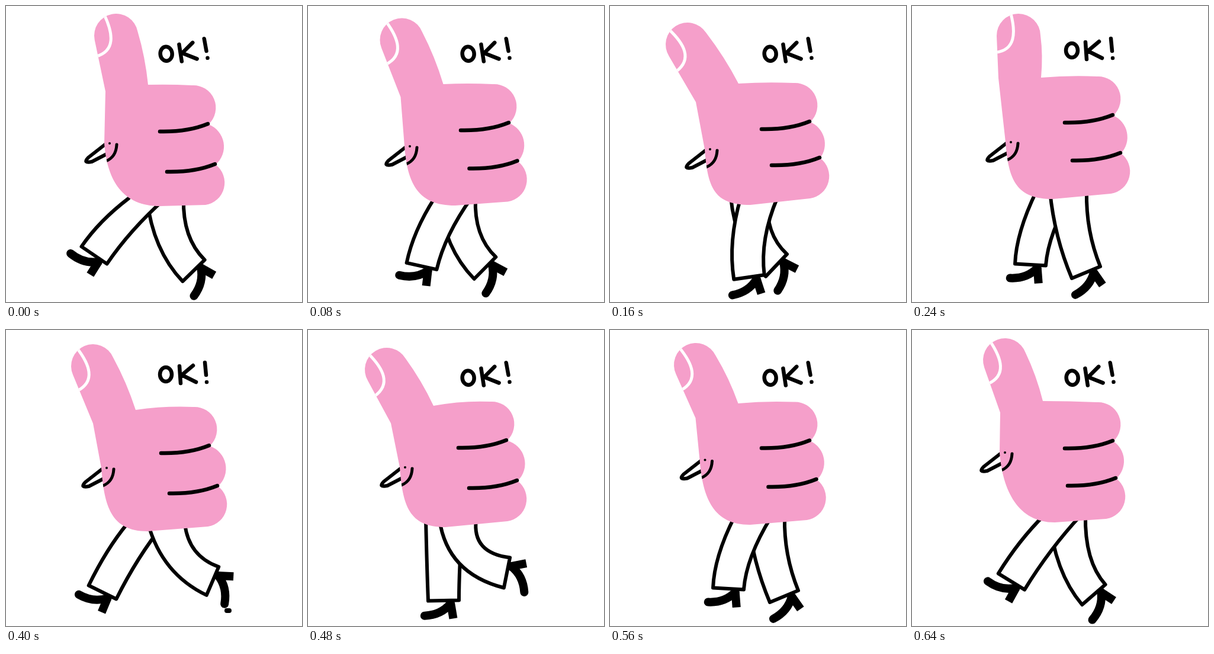
Write an HTML page with a canvas that moves like this. It is 500 px wide and 500 px high and loops after 0.72 s.

```html
<!DOCTYPE html>
<html lang="en">
<head>
<meta charset="utf-8">
<title>Walking thumb</title>
<style>
  html, body { margin: 0; height: 100%; overflow: hidden; background: #fff; }
  canvas { display: block; width: 100vw; height: 100vh; }
</style>
</head>
<body>
<canvas id="stage" width="500" height="500" role="img" aria-label="OK!"></canvas>
<script>
const ctx = document.getElementById('stage').getContext('2d');
const PINK = '#f59fca', BLACK = '#000', WHITE = '#fff';
const STEP = 80, THUMB = 37;

// tip: centre of the thumb's end, web: where thumb and fist meet,
// gaps: between the fingers. Legs: hip x, knee x y, ankle x y.
const stride = {
  tip: [186, 50], web: [240, 133], gap1: [342, 200], gap2: [354, 268], eye: [175, 232],
  near: [238, 183, 371, 149, 421], far: [269, 273, 402, 317, 447]
};
const pass = {
  tip: [131, 65], web: [217, 131], gap1: [338, 196], gap2: [355, 257], eye: [169, 242],
  near: [252, 226, 396, 235, 458], far: [235, 237, 396, 281, 438]
};
const reach = {
  tip: [180, 50], web: [218, 121], gap1: [340, 185], gap2: [353, 249], eye: [167, 230],
  near: [264, 267, 385, 294, 450], far: [241, 203, 384, 200, 437]
};
const kick = {
  tip: [147, 61], web: [219, 135], gap1: [344, 196], gap2: [358, 264], eye: [170, 233],
  near: [271, 286, 397, 349, 424], far: [236, 196, 376, 163, 443],
  speck: [375, 474]
};
const plant = {
  tip: [133, 67], web: [212, 128], gap1: [336, 187], gap2: [354, 255], eye: [164, 232],
  near: [253, 256, 394, 336, 410], far: [230, 228, 407, 229, 457]
};
const land = {
  tip: [157, 51], web: [221, 120], gap1: [340, 188], gap2: [345, 251], eye: [157, 207],
  near: [255, 206, 363, 168, 425], far: [262, 266, 400, 307, 447]
};

function midway(a, b) {
  const pose = {};
  for (const part in a) pose[part] = a[part].map((v, i) => (v + b[part][i]) / 2);
  return pose;
}

// The near leg swings forward past the far one.
const swing = { ...midway(plant, land), near: reach.far, far: reach.near };
const poses = [stride, midway(stride, pass), pass, reach, midway(reach, kick), kick, plant, swing, land];

const add = ([x, y], dx, dy) => [x + dx, y + dy];
const mid = (a, b) => [(a[0] + b[0]) / 2, (a[1] + b[1]) / 2];
const unit = (x, y) => [x / Math.hypot(x, y), y / Math.hypot(x, y)];

function stroke(path, width, color = BLACK, cap = 'round') {
  ctx.lineWidth = width;
  ctx.strokeStyle = color;
  ctx.lineCap = cap;
  ctx.stroke(new Path2D(path));
}

function fill(path, color) {
  ctx.fillStyle = color;
  ctx.fill(new Path2D(path));
}

// Runs paint with the origin moved to a point and turned.
function at([x, y], angle, paint) {
  ctx.save();
  ctx.translate(x, y);
  ctx.rotate(angle);
  paint();
  ctx.restore();
}

function drawLeg([hipX, kneeX, kneeY, ankleX, ankleY], hipY) {
  const shin = unit(ankleX - kneeX, ankleY - kneeY);
  const hem = [shin[1], -shin[0]];
  const knee = unit(1 + hem[0], hem[1]);
  const edge = (x, y, dir, half) => [x + dir[0] * half, y + dir[1] * half];

  const heel = edge(ankleX + shin[0] * 5, ankleY + shin[1] * 5, hem, 12);
  const footAngle = 0.87 + 1.18 * Math.atan2(shin[1], shin[0]);
  at(heel, footAngle, () => {
    stroke('M49 0Q23 -11 0 0', 14);
    stroke('M0 0L7 -25', 14, BLACK, 'butt');
  });

  const trouser = `M${hipX - 31} ${hipY}
    Q${edge(kneeX, kneeY, knee, -27)} ${edge(ankleX, ankleY, hem, -26)}
    L${edge(ankleX, ankleY, hem, 26)}
    Q${edge(kneeX, kneeY, knee, 27)} ${hipX + 31} ${hipY}`;
  fill(trouser, WHITE);
  stroke(trouser, 6);
}

function drawHand({ tip, web, gap1, gap2, eye }) {
  // The thumb's right side runs from the web as a tangent to its round end.
  const dx = web[0] - tip[0], dy = web[1] - tip[1];
  const tilt = Math.atan2(dx, dy) - Math.asin(THUMB / Math.hypot(dx, dy));
  const across = [THUMB * Math.cos(tilt), -THUMB * Math.sin(tilt)];
  const left = add(tip, -across[0], -across[1]);
  const right = add(tip, ...across);
  const base = add(web, -72, 58 * Math.sin(tilt));
  const top = add(gap1, -28, -66);
  const side = add(eye, -9, 0);

  const hand = `M${base}L${left}A37 37 0 0 1 ${right}
    Q${add(mid(right, web), 4, -2)} ${web}
    Q${(web[0] + top[0]) / 2} ${top[1] - 2} ${top}
    A38 38 0 0 1 ${gap1}A40 40 0 0 1 ${gap2}A38 38 0 0 1 ${add(gap2, -17, 68)}
    L${add(web, 20, 205)}
    C${add(web, -42, 205)} ${add(side, 5, 64)} ${side}Z`;

  at(eye, 0, () => {
    const nose = 'M-4 -1L-36 24Q-46 34 -30 31L-1 16';
    fill(nose, WHITE);
    stroke(nose, 6);
  });
  fill(hand, PINK);
  for (const gap of [gap1, gap2]) at(gap, 0, () => stroke('M-82 12Q-35 13 -1 -1', 6.5));

  ctx.save();
  ctx.clip(new Path2D(hand));
  at(tip, -tilt, () => stroke('M-13 -39C-4 -4 -6 25 -40 28', 5, WHITE));
  at(eye, 0, () => {
    stroke('M0 0h.01', 4);
    stroke('M12 2Q11 23 -6 30', 5);
  });
  ctx.restore();
}

function drawLetters(angle) {
  at([338, 70], angle, () => stroke(
    'M-58 5A10 12 0 0 1 -78 5A10 12 0 0 1 -58 5' +
    'M-45 -9L-43 20M-22 -10L-41 6L-17 18' +
    'M-2 -15L0 6M1 18h.01', 6.5));
}

function draw(frame) {
  const pose = poses[frame];
  const hipY = pose.web[1] + 192;
  fill('M0 0H500V500H0Z', WHITE);
  ctx.lineJoin = 'round';
  drawLeg(pose.far, hipY);
  drawLeg(pose.near, hipY);
  if (pose.speck) at(pose.speck, 0, () => stroke('M-2 0h4', 8));
  drawHand(pose);
  drawLetters(frame % 6 < 3 ? -0.085 : 0);
}

function tick() {
  draw(Math.floor(performance.now() / STEP) % poses.length);
  requestAnimationFrame(tick);
}
tick();
</script>
</body>
</html>
```
